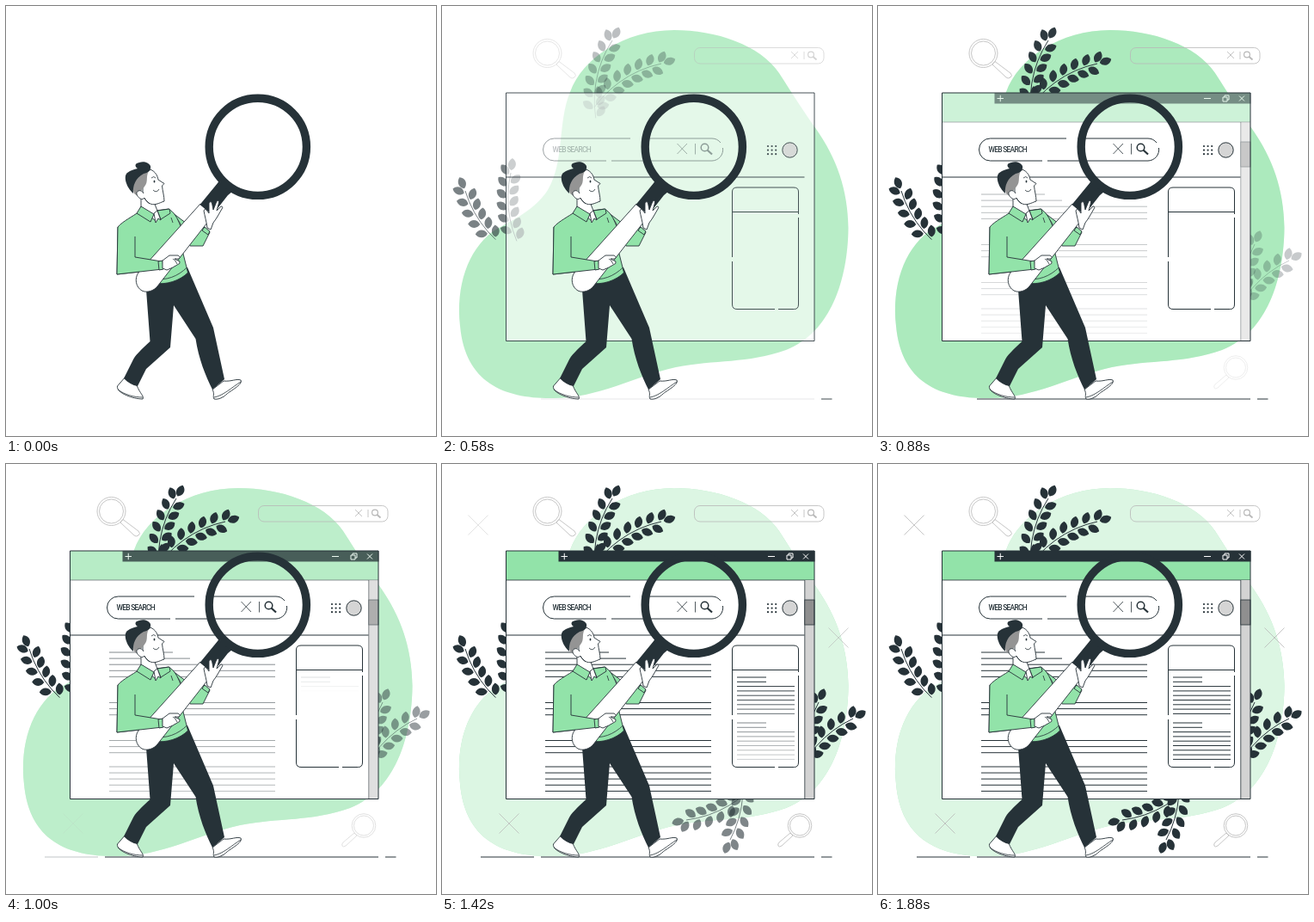
An HTML page for the animation above (2 s loop, 500 by 500 pixels).

```html
<!DOCTYPE html>
<html lang="en">
<head>
<meta charset="utf-8">
<title>Web search</title>
<style>
  html, body { margin: 0; width: 100%; height: 100%; overflow: hidden; background: #fff; }
  svg { display: block; width: 100vw; height: 100vh; }
  .ink { fill: none; stroke: #263238; stroke-width: 1; }
  .thin { stroke-width: .8; }
  .pale { fill: none; stroke: #b8b8b8; stroke-width: .8; }
  .white { fill: #fff; stroke: #263238; stroke-width: .9; stroke-linejoin: round; }
  .knit { fill: #92e3a9; stroke: #263238; stroke-width: .9; stroke-linejoin: round; }
  .dark { fill: #263238; }
  .label { font: 500 8.4px Roboto, sans-serif; letter-spacing: -.7px; fill: #263238; }
</style>
</head>
<body>
<svg viewBox="0 0 500 500" preserveAspectRatio="xMidYMid meet">
  <defs>
    <path id="blob" d="M270 28C318 28 370 45 392 78C408 103 420 122 435 143C459 177 472 214 472.500 258C472 318 452 380 400 400C355 416 318 411 272 420C222 431 182 456 130 456C75 457 27 440 21 372C16 325 30 285 58 263C78 250 106 240 123 214C143 180 134 136 149 100C163 61 212 28 270 28Z"/>
    <path id="leaf" d="M0 0H3C5-5 12-7 17-1C14 6 6 5.500 3 0"/>
    <path id="cross" d="M-11.500-11.500l23 23m0-23l-23 23"/>
  </defs>

  <use href="#blob" fill="#92e3a9" data-in="290 740"/>
  <use href="#blob" fill="#fff" data-in="700 1220" data-max=".68"/>

  <g class="pale">
    <g data-in="290 770">
      <rect x="293.500" y="48.500" width="150.500" height="18.500" rx="6.500"/>
      <path d="M406 53l8 8m0-8l-8 8M421 53v9"/>
      <circle cx="429" cy="56.500" r="3.400" stroke-width="1.200"/>
      <path d="M431.500 59l4 3.500" stroke-width="1.800"/>
    </g>
    <g data-in="410 800">
      <circle cx="122.500" cy="55" r="16.500"/><circle cx="122.500" cy="55" r="14"/>
      <path d="M133 68l3-3.500 18 13.500q3 3 0 5t-5 0z"/>
    </g>
    <g data-in="720 1250">
      <circle cx="416" cy="420.500" r="13.800"/><circle cx="416" cy="420.500" r="11.500"/>
      <path d="M405 429l3 3-13 12q-3 2-4 0t1-4z"/>
    </g>
    <use href="#cross" x="78" y="418" data-in="900 1450"/>
    <use href="#cross" x="461" y="202" data-in="1050 1520"/>
    <use href="#cross" x="42" y="71" data-in="1200 1650"/>
  </g>

  <g id="plants"></g>

  <g class="ink">
    <path data-in="280 620" d="M441 457H453.500"/>
    <path data-in="540 900" d="M115 457H433"/>
    <path data-in="880 1300" d="M45 457H107"/>
  </g>

  <rect x="74.500" y="101" width="358.500" height="288.500" fill="#fff" data-in="290 760"/>
  <g data-in="620 1200">
    <rect x="74.500" y="101" width="358.500" height="34" fill="#92e3a9"/>
    <path class="ink thin" d="M74.500 135H433"/>
  </g>
  <g data-in="630 1150">
    <rect x="421.800" y="135" width="11.200" height="254.500" fill="#d3d3d3"/>
    <path class="ink thin" d="M421.800 135V389.500"/>
    <rect class="ink thin" x="421.800" y="158" width="11.200" height="29" style="fill:#8f8f8f"/>
  </g>
  <path class="ink" data-in="270 640" d="M74.500 101H433V389.500H74.500ZM74.500 199H421.500"/>
  <g data-in="620 1120">
    <rect class="dark" x="135.500" y="101" width="298" height="12.500"/>
    <path d="M138.500 107.500h7.500m-3.750-3.750v7.500M379 107.500h8M401 106h5v5h-5zM403 106v-2h5v5h-2M420 104.500l6 6m0-6l-6 6" fill="none" stroke="#fff"/>
  </g>

  <g class="ink" data-in="380 820">
    <path d="M219 154H130.500a13 13 0 0 0 0 26H191M197 180H314A13 13 0 0 0 326.500 165M324 159A13 13 0 0 0 314 154H232"/>
    <path class="thin" d="M273.500 160l11.500 12m0-12l-11.500 12M294.500 160v12.500"/>
    <circle cx="305.500" cy="164.500" r="4.300" stroke-width="1.500"/>
    <path d="M308.500 167.500l5.500 5" stroke-width="2.200"/>
  </g>
  <text class="label" x="128.500" y="169.800" data-in="440 900">WEB SEARCH</text>

  <g data-in="270 640">
    <g id="dots" class="dark"></g>
    <circle class="ink" cx="404.500" cy="167.500" r="8.700" style="fill:#d5d5d5"/>
    <path class="ink" d="M414.500 246V347q0 5.500-5 5.500H391M387 352.500H343q-5.500 0-5.500-5.500V297M337.500 292V216q0-5 5.500-5H409q5.500 0 5.500 5V242M337.500 239.500H414.500"/>
  </g>

  <g id="lines" class="ink"></g>

  <g id="man">
    <path class="knit" d="M189 237C195 241 198 246 202 252L214 279L229 279L237 263L231 257L222 262Z"/>
    <path class="white" d="M139 431L129.500 442C128 450 148 457 159 457C161 454 156 451 152 441ZM240 446L253 436C262 437 268 433 273 435C276 440 260 448 257 451C253 455 247 458 242 457C240 454 243 451 240 446Z"/>
    <path class="ink thin" d="M130 446C138 452 149 455 159 455M242 455C253 453 263 443 273 437"/>
    <path class="dark" d="M163 330L167.500 390C157 400 150 406 147 413L137 433C142 438 147 441 153 442L163 422L191 397L195 348L220.500 387C224 410 232 430 240 446L254 434L241 374L211 304L178 320Z"/>
    <path class="knit" d="M155 239C147 245 136 250 130 257L129 312L165 308L172 322C186 325 203 319 211.500 310L206 288L203 256C199 246 196 240 189 236L174 238Z"/>
    <path class="ink thin" d="M170 317C187 320 200 314 210.500 304M192 246L194 252"/>

    <path class="white" d="M157 220V235L174 250L176 238L172 228Z"/>
    <path class="white" d="M159 198L168 190C174 193 176 197 177 202L184 206.500L181.500 209C182 215 184 221 184 227C178 229 172 233 166 229L159 222Z"/>
    <path fill="#949494" d="M149 218C146 211 149 201 157 195L166 192C162 199 166 204 161 210L157 215L153 221Z"/>
    <path class="white" d="M160 224C157 226 153 222 152 219C151 214 158 213 160 218"/>
    <path class="dark" d="M148 218C140 211 136 198 141 194C145 191 149 190 153 189C149 186 150 183 155 182C160 180 166 182 168 186C169 191 165 194 160 195C151 200 147 208 148 218Z"/>
    <path class="ink thin" d="M169 200Q172 197 174 200M171 214Q175 218 178 213M161 223Q163 228 167 230"/>
    <ellipse class="dark" cx="172.500" cy="204" rx=".9" ry="1.500"/>
    <path class="knit" d="M157 233L152 241L168 251L172 242ZM176 238L190 236L191 241L180 248Z"/>
    <path class="white" d="M172 241L174 252L177 247L180 249L176 238Z"/>

    <path class="white" d="M226 230L154 310C149 317 151 327 158 331C164 334 172 331 176 326L241 243Z"/>
    <path class="dark" d="M225.500 231L246 206L249 201L264 215L258 220L240 243Z"/>
    <circle cx="292.800" cy="163.800" r="56.600" fill="none" stroke="#263238" stroke-width="9.400"/>

    <path class="white" d="M234 258C233 250 231 244 230 238Q231 235 233 237L236 241L236 229Q238 226 239.500 229L241 237L245 227Q248 225 247.500 229L245 238L250 233Q253 233 251 236C248 241 245 247 241 252L238 260Z"/>
    <path class="knit" d="M231 257L237 262L235 266L228 261Z"/>
    <path class="knit" d="M130 257L129 312L182 306L181 297L150 292L150 268"/>
    <path class="knit" d="M177 297L182 296L183 306L178 307Z"/>
    <path class="white" d="M182 296L190 290L200 290Q204 292 201 294L196 294L202 297Q203 300 199 301L194 304L187 307L182 305Z"/>
    <path class="ink thin" d="M194 294Q197 295 199 300"/>
  </g>
</svg>
<script>
const LOOP = 2000;
const make = (parent, tag, attrs) => {
  const el = document.createElementNS("http://www.w3.org/2000/svg", tag);
  for (const key in attrs) el.setAttribute(key, attrs[key]);
  return parent.appendChild(el);
};
const byId = id => document.getElementById(id);

// Grows from the tip back to the root, turning a little at each pair of leaves
function sprig(x, y, heading, pairs, span) {
  const STEP = 13.5, TURN = 6;
  const g = make(byId("plants"), "g", { "data-in": span });
  const leaf = turn => make(g, "use", {
    href: "#leaf", class: "dark", transform: `translate(${x} ${y}) rotate(${heading + turn})`
  });
  const back = dist => {
    x -= dist * Math.cos(heading * Math.PI / 180);
    y -= dist * Math.sin(heading * Math.PI / 180);
  };
  let stem = `M${x} ${y}`;
  leaf(0);
  for (let i = 0; i < pairs; i++) {
    back(STEP * .3);
    leaf(-45);
    back(STEP * .7);
    leaf(45);
    stem += `L${x} ${y}`;
    heading -= TURN;
  }
  make(g, "path", { class: "ink", d: stem });
}

sprig(27, 215, -110, 5, "290 770");
sprig(80, 194, -80, 6, "290 770");
sprig(198, 40, -60, 7, "440 900");
sprig(255, 67, -15, 7, "440 900");
sprig(478, 296, -28, 5, "740 1300");
sprig(438, 277, -65, 5, "740 1300");
sprig(284, 414, 170, 5, "1020 1700");
sprig(335, 437, 115, 5, "1020 1700");

for (let i = 0; i < 9; i++)
  make(byId("dots"), "circle", { cx: 379 + i % 3 * 4.6, cy: 163 + Math.floor(i / 3) * 4.6, r: 1.1 });

const rule = (x0, x1, y, from, to) =>
  make(byId("lines"), "path", { d: `M${x0} ${y}H${x1}`, "data-in": from + " " + to });

// Page text: paragraphs of evenly spaced lines
for (const [top, count] of [[219, 5], [277.5, 3], [321.5, 3], [352, 5]])
  for (let i = 0; i < count; i++) {
    const y = top + i * 7.1, delay = y - top * .2 - 175;
    rule(120, y < 220 ? 194 : y < 230 ? 214 : 313, y, 700 + delay, 1220 + delay);
  }

// Card text: two blocks, each opening with two short lines
for (let block = 0; block < 2; block++)
  for (let i = 0; i < 9; i++) {
    const n = block * 10 + i;
    rule(343, i < 2 ? 377 : 410, 248 + n * 5.3, 930 + n * 21, 1400 + n * 22);
  }

const parts = [...document.querySelectorAll("[data-in]")].map(el => {
  const [from, to] = el.dataset.in.split(" ").map(Number);
  return { el, from, to, max: Number(el.dataset.max || 1) };
});

function draw(t) {
  for (const { el, from, to, max } of parts)
    el.style.opacity = max * Math.min(1, Math.max(0, (t - from) / (to - from)));
}

const start = performance.now();
function tick() {
  draw((performance.now() - start) % LOOP);
  requestAnimationFrame(tick);
}
draw(0);
tick();
</script>
</body>
</html>
```
